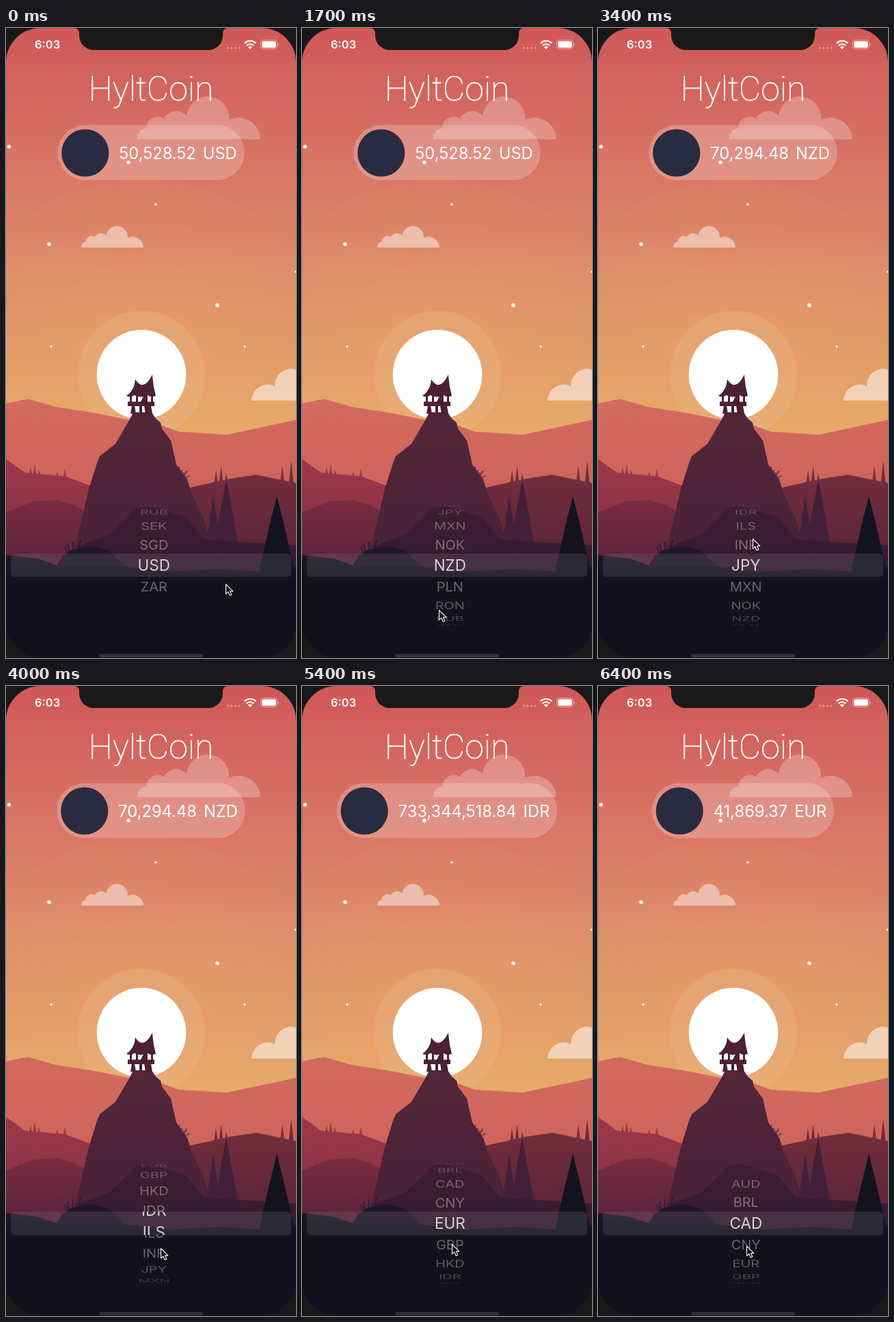
Recreate the animation shown at these times as an HTML page. Size 424 by 918 pixels, loop 6500 ms.

```html
<!DOCTYPE html>
<html lang="en">
<head>
<meta charset="utf-8">
<title>Coin price picker</title>
<style>
  html, body { margin: 0; width: 100%; height: 100%; overflow: hidden; background: #1a1919; }
  svg { display: block; width: 100%; height: 100%; }
  text { font-family: Inter, Arial, sans-serif; fill: #fff; }
  .title { font: 100 50px Roboto, Arial, sans-serif; stroke: #fff; stroke-width: .6px; text-anchor: middle; }
  .clock { font-size: 16.5px; font-weight: 600; }
  .price { font-size: 23.7px; }
  .wheel text { text-anchor: middle; }
  .dim text { font-size: 20px; }
  .bright text { font-size: 22.5px; }
</style>
</head>
<body>
<svg viewBox="0 0 424 918">
  <defs>
    <linearGradient id="sky" x2="0" y2="600" gradientUnits="userSpaceOnUse">
      <stop offset="0" stop-color="#cf5858"/>
      <stop offset=".36" stop-color="#d97766"/>
      <stop offset=".6" stop-color="#dd8d69"/>
      <stop offset="1" stop-color="#e5ab69"/>
    </linearGradient>
    <linearGradient id="far" x2="0" y2="1">
      <stop offset="0" stop-color="#d36a5e"/><stop offset="1" stop-color="#c95e58"/>
    </linearGradient>
    <linearGradient id="left" x2="0" y2="1">
      <stop offset="0" stop-color="#9b3848"/><stop offset="1" stop-color="#823046"/>
    </linearGradient>
    <linearGradient id="right" x2="0" y2="1">
      <stop offset="0" stop-color="#722d3c"/><stop offset="1" stop-color="#552339"/>
    </linearGradient>
    <linearGradient id="near" x2="0" y2="1">
      <stop offset="0" stop-color="#792c40"/><stop offset="1" stop-color="#54223a"/>
    </linearGradient>
    <linearGradient id="rock" x2="0" y2="1">
      <stop offset="0" stop-color="#542638"/><stop offset="1" stop-color="#472138"/>
    </linearGradient>
    <linearGradient id="hill" x2="0" y2="1">
      <stop offset="0" stop-color="#3e1d35"/><stop offset="1" stop-color="#311a31"/>
    </linearGradient>
    <linearGradient id="ground" x2="0" y2="1">
      <stop offset="0" stop-color="#1c1826"/><stop offset=".25" stop-color="#13111e"/><stop offset="1" stop-color="#12111f"/>
    </linearGradient>
    <path id="cloud" d="M0 60A14 14 0 0 1 13 44A17 17 0 0 1 39 30A20 20 0 0 1 72 26A31 31 0 0 1 134 32A32 32 0 0 1 180 60Z"/>
    <clipPath id="band"><path d="M0 766H424V800H0Z"/></clipPath>
    <clipPath id="offBand"><path d="M0 694H424V766H0ZM0 800H424V871H0Z"/></clipPath>
  </defs>

  <path fill="url(#sky)" d="M0 0H424V918H0Z"/>
  <g id="halo" fill="#eab277"></g>
  <g id="stars" fill="#fff" opacity=".92"></g>
  <circle cx="198" cy="505" r="65.3" fill="#fff"/>
  <g fill="#fff">
    <use href="#cloud" opacity=".25" transform="translate(192 102)"/>
    <use href="#cloud" opacity=".45" transform="translate(110 289.5) scale(.506)"/>
    <use href="#cloud" opacity=".52" transform="translate(494 498) scale(-.75 .75)"/>
  </g>

  <path fill="url(#far)" d="M0 547L32 540.5L72 552L130 561L180 571L222 577L252 588L323 592.5L424 571V800H0Z"/>
  <path fill="url(#left)" d="M0 628L28 648L86 653L126 668V800H0Z"/>
  <path fill="url(#right)" d="M424 663L366 651L326 657L268 670L240 700V800H424Z"/>
  <g id="ridge"></g>
  <path fill="url(#near)" d="M0 706L40 690L74 688L100 695L130 712V800H0Z"/>

  <path fill="url(#rock)" d="M181 570L186 560H213L219 569L226 575L228 584L241 601L249 636L265 658L272 680L289 715L303 765V800H96L104 745L121 672L133 634L137 624L160 606Z"/>
  <g fill="#4d2134">
    <path d="M176 536Q188 528 189 512Q201 531 214 505Q215 522 219 536Q212 539 207 535Q198 540 188 535Q182 539 176 536Z"/>
    <path d="M181 534h3v11h-3zM190 534h3v11h-3zM202 534h5v11h-5zM212 534h3v11h-3zM197 545l3-7 3-2 1 9z"/>
    <path d="M178 544.5H217V551H178ZM184 550H188L190 562H182ZM195 550H199V562H195ZM202 550H212L214 563H204Z"/>
  </g>
  <g id="grass" stroke-linecap="round"></g>
  <g id="pines"></g>
  <path fill="url(#hill)" d="M84 790L108 754L152 737L175 715L188 700L205 696L235 704L262 712L290 745L330 748L424 754V830H84Z"/>
  <path fill="#211629" d="M68 795L82 770L98 760L122 755L147 760L162 772L182 795Z"/>
  <path fill="url(#ground)" d="M0 768L46 773L78 784L170 784L240 792L310 788L372 792L424 785V918H0Z"/>
  <g id="front"></g>

  <g id="pill">
    <rect y="141.5" height="80" rx="40" fill="#fff" opacity=".21"/>
    <circle cy="182" r="34.6" fill="#292c41"/>
    <text class="price" y="190.5"></text>
    <text class="price" y="190.5" text-anchor="end"></text>
  </g>
  <text class="title" x="212" y="106">HyltCoin</text>

  <rect x="7" y="766" width="410" height="34" rx="6" fill="#8b8994" opacity=".19"/>
  <g class="wheel dim" clip-path="url(#offBand)"></g>
  <g class="wheel bright" clip-path="url(#band)"></g>

  <rect x="136" y="912" width="152" height="5" rx="2.5" fill="#302f3b"/>
  <path fill="#1a1919" fill-rule="evenodd" d="M0 0H424V918H0ZM50 0H374A50 50 0 0 1 424 50V867A50 50 0 0 1 374 917H50A50 50 0 0 1 0 867V50A50 50 0 0 1 50 0Z"/>
  <path fill="#1a1919" d="M99 0Q107 0 107 8V11A21 21 0 0 0 128 32H296A21 21 0 0 0 317 11V8Q317 0 325 0Z"/>
  <text class="clock" x="42" y="30">6:03</text>
  <g fill="#fff">
    <path fill="none" stroke="#fff" stroke-width="3" stroke-linecap="round" stroke-dasharray="0 5.5" opacity=".4" d="M324.5 29H342"/>
    <path d="M357 31L353.8 27.7A4.6 4.6 0 0 1 360.2 27.7Z"/>
    <path fill="none" stroke="#fff" stroke-width="2.1" d="M348.8 22.2A11.6 11.6 0 0 1 365.2 22.2M351.7 25.4A7.5 7.5 0 0 1 362.3 25.4"/>
    <rect x="372.5" y="17.5" width="24" height="13" rx="3.8" fill="none" stroke="#fff" opacity=".45"/>
    <rect x="374.3" y="19.3" width="20.4" height="9.4" rx="2.3"/>
    <path opacity=".5" d="M397.7 22Q400 24 397.7 26.2Z"/>
  </g>
  <path id="cursor" fill="#111" stroke="#fff" stroke-width="1.1" stroke-linejoin="round" d="M.5 .5V14.6L3.8 11.6L6.2 17L8.8 15.9L6.5 10.7H10.8Z"/>
</svg>

<script>
const LOOP = 6500, STEP = 100, CENTRE = 212;
const ROW_TIME = 233, ROW_DRAG = 32, ROW_ANGLE = .361, RADIUS = 87.7;
const PRICE_DELAY = 200;
const CODES = 'AUD BRL CAD CNY EUR GBP HKD IDR ILS INR JPY MXN NOK NZD PLN RON RUB SEK SGD USD ZAR'.split(' ');

// Each swipe turns the wheel down to a code; some are followed by a new price.
const START = { code: 'USD', price: '50,528.52', pointer: [321, 810] };
const SWIPES = [
  { start: 300, code: 'NZD', grab: [200, 752], price: '70,294.48' },
  { start: 2140, code: 'JPY', grab: [221, 734] },
  { start: 3500, code: 'IDR', grab: [226, 744], price: '733,344,518.84' },
  { start: 4650, code: 'EUR', grab: [219, 738], price: '41,869.37' },
  { start: 5950, code: 'CAD', grab: [217, 752] }
];
// The price shown after a swipe belongs to the code it stops at.
let row = CODES.indexOf(START.code);
for (const swipe of SWIPES) {
  swipe.from = row;
  row = CODES.indexOf(swipe.code);
  swipe.rows = swipe.from - row;
  swipe.end = swipe.start + swipe.rows * ROW_TIME;
}

const $ = selector => document.querySelector(selector);
const smooth = p => (p = Math.min(1, Math.max(0, p)), p * p * (3 - 2 * p));
const turned = (swipe, t) => swipe.rows * smooth((t - swipe.start) / (swipe.end - swipe.start));

function make(parent, tag, attrs) {
  const node = document.createElementNS('http://www.w3.org/2000/svg', tag);
  for (const key in attrs) node.setAttribute(key, attrs[key]);
  return $(parent).appendChild(node);
}

function pine(parent, fill, x, y, w, h) {
  make(parent, 'path', {
    fill, d: `M${x} ${y}q${w * .24} ${h * .43} ${w / 2} ${h}h${-w}q${w * .26} ${-h * .57} ${w / 2} ${-h}z`
  });
}

function grove(fill, from, to, count, base, height) {
  for (let i = 0; i < count; i++) {
    const h = height * (.75 + .25 * Math.sin(i * 2));
    pine('#ridge', fill, from + (to - from) * i / (count - 1), base - h, 3 + h * .13, h);
  }
}

function tuft(x, y, width, height, lean, color) {
  for (let p = 0; p <= 1; p += .14) {
    const h = height * (.6 + .4 * Math.sin(p * 17));
    make('#grass', 'path', {
      stroke: color, 'stroke-width': 1.3,
      d: `M${x + width * p} ${y + lean * p}l${(p - .4) * 9} ${-h}`
    });
  }
}

for (let r = 285; r > 100; r -= 60) make('#halo', 'circle', { cx: 198, cy: 505, r, opacity: .035 });
make('#halo', 'circle', { cx: 198, cy: 505, r: 93, opacity: .3, fill: '#e9b88b' });

[[4.5, 173], [219, 257], [63, 315], [423.5, 355], [309, 404], [66, 464], [179, 196], [349, 464]]
  .forEach(([cx, cy], i) => make('#stars', 'circle', { cx, cy, r: i % 2 ? 1.65 : 2.8 }));

grove('#96364a', 36, 48, 3, 653, 18);
grove('#96364a', 75, 86, 2, 656, 14);
grove('#742e3d', 307, 322, 3, 663, 25);
grove('#742e3d', 404, 417, 2, 665, 35);
grove('#6f2840', 12, 40, 4, 760, 70);
pine('#pines', '#43203a', 303, 680, 20, 72);
pine('#pines', '#43203a', 322, 659, 34, 92);
pine('#front', '#151320', 396, 682, 54, 115);
tuft(246, 640, 17, 7, 15, '#4d2337');
tuft(90, 766, 18, 16, -5, '#211629');
tuft(128, 760, 22, 9, 6, '#211629');

const [pillBody, coin, amount, code] = $('#pill').children;
const layers = ['.dim', '.bright'].map(parent => CODES.map(name => {
  const label = make(parent, 'text', { y: 7.7 });
  label.textContent = name;
  return label;
}));

function drawWheel(t) {
  const position = SWIPES.reduce((at, swipe) => at - turned(swipe, t), SWIPES[0].from);
  layers.forEach((labels, bright) => labels.forEach((label, i) => {
    const angle = (i - position) * ROW_ANGLE;
    const flat = Math.abs(angle) < Math.PI / 2 ? Math.cos(angle) : 0;
    label.setAttribute('transform', `translate(216.3 ${783.3 + RADIUS * Math.sin(angle)}) scale(1 ${flat})`);
    label.setAttribute('opacity', bright ? .78 : flat && .08 + .3 * flat);
  }));
}

function drawPill(t) {
  const shown = SWIPES.filter(s => s.price && t >= s.end + PRICE_DELAY).pop() ?? START;
  amount.textContent = shown.price;
  code.textContent = shown.code;
  const width = 111 + amount.getComputedTextLength() + code.getComputedTextLength();
  const left = CENTRE - width / 2;
  pillBody.setAttribute('x', left);
  pillBody.setAttribute('width', width);
  coin.setAttribute('cx', left + 40.5);
  amount.setAttribute('x', left + 90);
  code.setAttribute('x', left + width - 11);
}

// The pointer holds the wheel for part of a swipe, then travels to the next grab.
function pointerAt(t) {
  let [x, y] = START.pointer;
  for (const swipe of SWIPES) {
    const travel = smooth((t - swipe.start + 300) / 200);
    const held = Math.min(turned(swipe, t), Math.max(2.35, swipe.rows / 2));
    x += (swipe.grab[0] - x) * travel;
    y += (swipe.grab[1] - y) * travel + held * ROW_DRAG;
  }
  return [x, y];
}

function draw(now) {
  const t = Math.floor((now % LOOP) / STEP) * STEP;
  drawWheel(t);
  drawPill(t);
  $('#cursor').setAttribute('transform', `translate(${pointerAt(t)})`);
}

let start;
function tick(now) {
  start ??= now;
  draw(now - start);
  requestAnimationFrame(tick);
}
draw(0);
requestAnimationFrame(tick);
</script>
</body>
</html>
```
